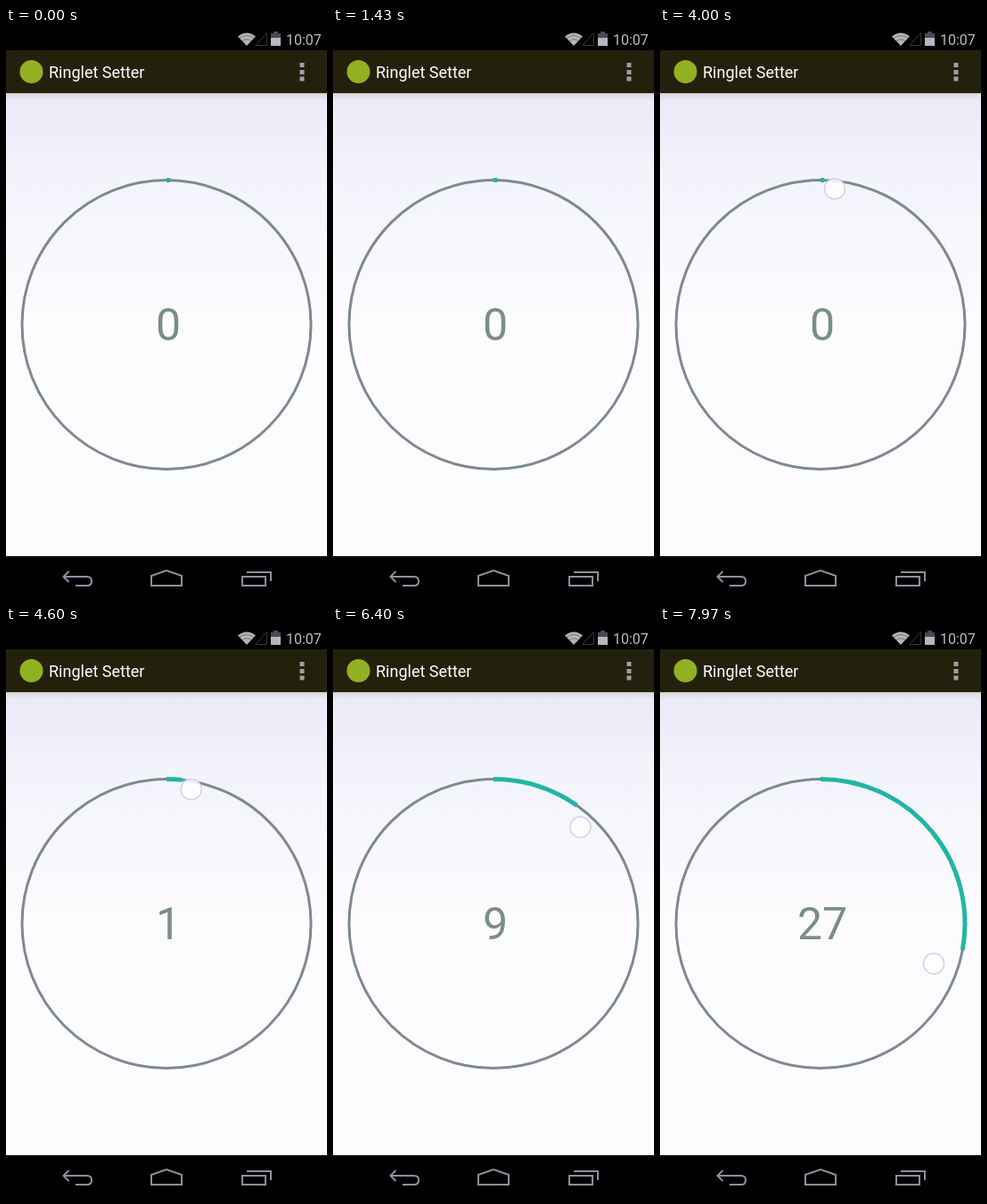
An HTML page that plays this animation: 360x640 px, repeating every 8 s.

```html
<!DOCTYPE html>
<html lang="en">
<head>
<meta charset="utf-8">
<title>Ring dial</title>
<style>
  html, body { margin: 0; width: 100%; height: 100%; overflow: hidden; background: #000; }
  svg { display: block; width: 360px; height: 640px; }
  text { font-family: Roboto, "Open Sans", sans-serif; }
  .nav { fill: none; stroke: #8e8e9e; stroke-width: 2; }
</style>
</head>
<body>
<svg viewBox="0 0 360 640">
  <defs>
    <linearGradient id="page" x1="0" y1="0" x2="0" y2="1">
      <stop offset="0" stop-color="#e9e9f8"/>
      <stop offset=".15" stop-color="#f2f2fb"/>
      <stop offset=".5" stop-color="#fcfcfe"/>
      <stop offset="1" stop-color="#fcfcff"/>
    </linearGradient>
    <linearGradient id="shade" x1="0" y1="0" x2="0" y2="1">
      <stop offset="0" stop-color="#cfcbc8"/>
      <stop offset=".3" stop-color="#dfdce0"/>
      <stop offset="1" stop-color="#e8e7f2"/>
    </linearGradient>
  </defs>

  <rect width="360" height="640"/>
  <rect y="73" width="360" height="519" fill="url(#page)"/>
  <rect y="73" width="360" height="7" fill="url(#shade)"/>
  <rect y="25" width="360" height="48" fill="#23210c"/>

  <!-- status bar -->
  <path d="M260 9.500Q270 1.500 280 9.500L270 20Z" fill="#b4b4b4"/>
  <path d="M262 11.500Q270 5.500 278 11.500M265 14.500Q270 11 275 14.500" fill="none" stroke="#666" stroke-width=".8"/>
  <path d="M280 19.500H292.500V5.500Z" fill="none" stroke="#383830"/>
  <path d="M300 4H305V6H308V20H297V6H300Z" fill="#4c4858"/>
  <path d="M297 11H308V20H297Z" fill="#b8b8bc"/>
  <text x="314" y="19" font-size="16" fill="#bcbcbc">10:07</text>

  <!-- action bar -->
  <circle cx="28.500" cy="49" r="13" fill="#93b022"/>
  <text x="48" y="56" font-size="18" fill="#fff">Ringlet Setter</text>
  <path d="M329.500 39h5v5h-5zM329.500 47h5v5h-5zM329.500 54.500h5v5h-5z" fill="#a0a0a4"/>

  <!-- navigation bar -->
  <path class="nav" d="M70.500 609L64.500 615L70.500 621M65 615H91Q96 615 96 620Q96 625 91 625H78"/>
  <path class="nav" d="M163 625V614L180 608L197 614V625Z"/>
  <path class="nav" d="M265 615H291V625H265ZM270 610H297V620"/>

  <!-- dial -->
  <circle cx="180" cy="332.400" r="162" fill="none" stroke="#7d8a90" stroke-width="3"/>
  <path id="arc" fill="none" stroke="#22b5a3" stroke-width="5"/>
  <text id="value" x="182" y="350" font-size="50" text-anchor="middle" fill="#7a8d8a">0</text>
  <circle id="touch" r="11.500" fill="#fff" fill-opacity=".85" stroke="#cfcdf4" stroke-width="1.500"/>
</svg>
<script>
  const LOOP = 8000, TOUCH_AT = 3870;
  const CX = 180, CY = 332.4, R = 162;
  const times = [4000, 5430, 6400, 7970];
  const arcDegrees = [1.5, 16.5, 35.2, 100.5];
  const touchDegrees = [6, 21.1, 42, 109.5];
  const touchRadius = [153, 151.2, 145.5, 134.7];
  const byId = id => document.getElementById(id);
  const arc = byId('arc'), value = byId('value'), touch = byId('touch');

  // Smooth curve through the points, held flat outside them.
  function curve(ys) {
    const last = times.length - 1;
    const slopes = times.slice(1).map((t, i) => (ys[i + 1] - ys[i]) / (t - times[i]));
    const tangents = ys.map((_, i) => i && i < last ? (slopes[i - 1] + slopes[i]) / 2 : 0);
    tangents[0] = 2 * slopes[0] - tangents[1];
    tangents[last] = 2 * slopes[last - 1] - tangents[last - 1];
    return time => {
      if (time <= times[0]) return ys[0];
      if (time >= times[last]) return ys[last];
      const i = times.findIndex(t => t > time) - 1;
      const span = times[i + 1] - times[i];
      const u = (time - times[i]) / span, v = 1 - u;
      return v * v * ((1 + 2 * u) * ys[i] + u * span * tangents[i])
        + u * u * ((3 - 2 * u) * ys[i + 1] - v * span * tangents[i + 1]);
    };
  }

  const arcAngle = curve(arcDegrees);
  const fingerAngle = curve(touchDegrees);
  const fingerRadius = curve(touchRadius);

  function polar(degrees, radius) {
    const a = degrees * Math.PI / 180;
    return [CX + radius * Math.sin(a), CY - radius * Math.cos(a)];
  }

  function draw(now) {
    const t = now % LOOP;
    const degrees = arcAngle(t);
    arc.setAttribute('d', `M${polar(0, R)}A${R} ${R} 0 0 1 ${polar(degrees, R)}`);
    value.textContent = Math.floor(degrees / 3.6);
    const [x, y] = polar(fingerAngle(t), fingerRadius(t));
    touch.setAttribute('cx', x);
    touch.setAttribute('cy', y);
    touch.style.display = t < TOUCH_AT ? 'none' : '';
  }

  const start = performance.now();
  function tick() {
    draw(performance.now() - start);
    requestAnimationFrame(tick);
  }
  tick();
</script>
</body>
</html>
```
